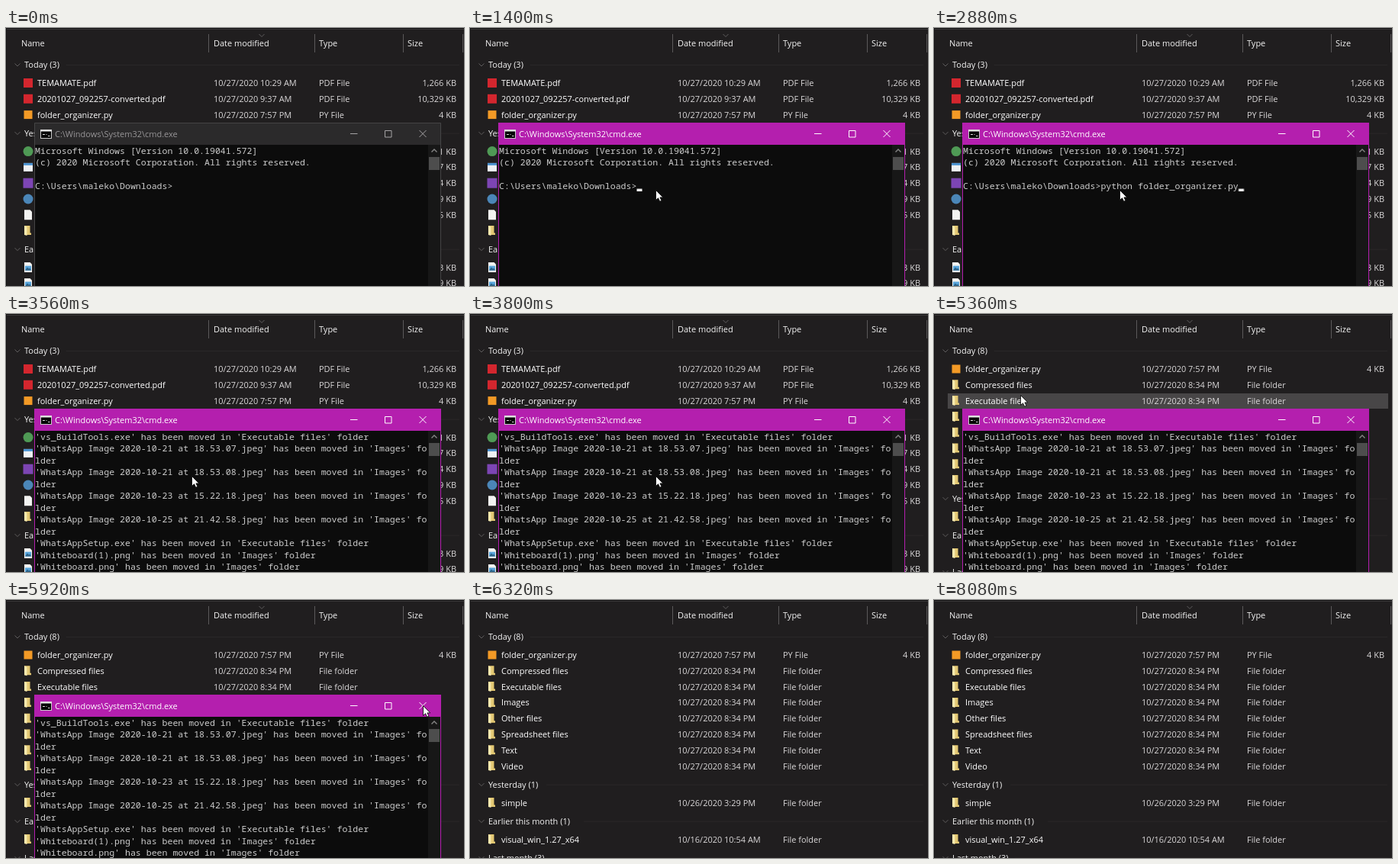
These frames come from a looping animation (600x338 px, 8160 ms). An HTML page:

```html
<!DOCTYPE html>
<html lang="en">
<head>
<meta charset="utf-8">
<title>Folder organizer</title>
<style>
  html, body { margin: 0; width: 100%; height: 100%; overflow: hidden; background: #201e1f; }
  svg { display: block; }
  #stage { width: 100vw; height: 100vh; }
  text { font: 10.97px "Open Sans", "Noto Sans", sans-serif; fill: #ffffff; }
  .dim { fill: #dad8d9; }
  .head { fill: #f4f4f4; }
  .end { text-anchor: end; }
  .console text { font: 11.57px "Noto Sans Mono", "DejaVu Sans Mono", monospace; fill: #cccccc; }
  .chevron { fill: none; stroke: #5f5d5e; }
  .rule { stroke: #2a2829; }

  /* One loop is 8160 ms; every part shares the same clock. */
  .anim { animation: 8160ms step-end infinite; }
  .before { animation-name: before; }
  .after { animation-name: after; }
  .window { animation-name: window; }
  .prompt { animation-name: prompt; }
  .output { animation-name: output; }
  .bar { animation-name: bar; }
  .frame { fill: none; animation-name: frame; }
  .title { animation-name: title; }
  .controls { fill: none; animation-name: controls; }
  .typing { animation-name: typing; }
  .caret { fill: #f2f2f2; animation-name: blink; }
  .hover { fill: #484647; animation-name: hover; }
  .pointer { animation-name: pointer; }

  @keyframes before { 0% { opacity: 1 } 48.529%, to { opacity: 0 } }
  @keyframes after { 0% { opacity: 0 } 48.529%, to { opacity: 1 } }
  @keyframes window { 0% { opacity: 1 } 73.039%, to { opacity: 0 } }
  @keyframes prompt { 0% { opacity: 1 } 42.647%, to { opacity: 0 } }
  @keyframes output { 0% { opacity: 0 } 42.647%, to { opacity: 1 } }
  @keyframes bar { 0% { fill: #2b2a2b } 16.176%, to { fill: #b41fae } }
  @keyframes frame { 0% { stroke: #454445 } 16.176%, to { stroke: #b41fae } }
  @keyframes title { 0% { fill: #979597 } 16.176%, to { fill: #ffffff } }
  @keyframes controls { 0% { stroke: #a5a3a5 } 16.176%, to { stroke: #ffffff } }
  @keyframes hover { 0% { opacity: 0 } 58.333% { opacity: 1 } 69.118%, to { opacity: 0 } }
  @keyframes blink {
    0% { opacity: 0 } 16.176% { opacity: 1 } 22.672% { opacity: 0 }
    29.167% { opacity: 1 } 35.662%, to { opacity: 0 }
  }
  @keyframes typing {
    0% { transform: translateX(0) }
    19.118% { transform: translateX(0); animation-timing-function: steps(26) }
    33.333%, to { transform: translateX(180.5px) }
  }
  @keyframes pointer {
    0% { transform: translate(330px, 345px) }
    10.784% { transform: translate(330px, 345px); animation-timing-function: ease-out }
    15.196% { transform: translate(243px, 212px) }
    52.941% { transform: translate(243px, 212px); animation-timing-function: ease-in-out }
    60.784% { transform: translate(113px, 106px) }
    66.667% { transform: translate(113px, 106px); animation-timing-function: ease-in-out }
    71.569% { transform: translate(546px, 138px) }
    73.039% { transform: translate(546px, 138px); animation-timing-function: ease-in }
    76.961%, to { transform: translate(615px, 165px) }
  }
</style>
</head>
<body>
<svg id="stage" viewBox="0 0 600 338">
  <rect width="600" height="338" fill="#201e1f"/>
  <rect width="600" height="1" fill="#111011"/>
  <path d="M0 1.5H600" stroke="#3b393a"/>
  <rect width="1" height="338" fill="#141314"/>
  <path d="M265.5 8V32M404.5 8V32M520.5 8V32M598.5 8V32" stroke="#5b595a"/>
  <path class="chevron" d="M331.500 8l3.500 3.500 3.500-3.500"/>
  <g id="columns"></g>
  <rect class="hover anim" x="18" y="104" width="577" height="20"/>
  <g id="before" class="before anim"></g>
  <g id="after" class="after anim"></g>

  <g class="window anim">
    <rect x="37" y="124" width="533" height="220" fill="#0c0c0c"/>
    <rect class="bar anim" x="37" y="124" width="533" height="29"/>
    <path class="frame anim" d="M37.5 338V124.5H569.5V338"/>
    <rect x="45.5" y="133.5" width="14" height="11" fill="#050505" stroke="#c9c9c9"/>
    <path d="M45 134.5H60" stroke="#e6e6e6" stroke-width="2"/>
    <path d="M48 139.5h3M52.5 139.5h1M55 141.5h2.500" stroke="#dddddd"/>
    <text class="title anim" x="64" y="143">C:\Windows\System32\cmd.exe</text>
    <path class="controls anim" d="M451 138.500h9.500M496.500 134.500h8.500v8.500h-8.500zM541.500 134l9 9M550.500 134l-9 9"/>
    <rect x="553" y="153" width="16" height="190" fill="#171717"/>
    <path d="M557.500 162.500l3.500-3.500 3.500 3.500" fill="none" stroke="#858585" stroke-width="1.400"/>
    <rect x="554" y="169" width="14" height="17" fill="#4d4d4d"/>
    <svg class="console" x="38" y="153" width="515" height="185">
      <g class="prompt anim">
        <g id="prompt"></g>
        <g class="typing anim">
          <rect x="180.500" y="47" width="340" height="16" fill="#0c0c0c"/>
          <rect class="caret anim" x="180.500" y="57.600" width="7" height="3.400"/>
        </g>
      </g>
      <g id="output" class="output anim"></g>
    </svg>
  </g>

  <g class="pointer anim">
    <path d="M.5 .5V13.500L3.500 10.700 5.700 15.200 8 14.200 5.900 9.900H9.800Z" fill="#fff" stroke="#111" stroke-width=".9"/>
  </g>
</svg>
<script>
  const byId = id => document.getElementById(id);
  const text = (x, y, str, cls = "") => `<text class="${cls}" x="${x}" y="${y}">${str}</text>`;
  const square = (color, r = 6) => `<rect x="${-r}" y="${-r}" width="${2 * r}" height="${2 * r}" fill="${color}"/>`;
  const disc = color => `<circle r="6.500" fill="${color}"/>`;
  const page = '<path d="M-5-6.500H2.500L5-4V6.500H-5Z" fill="#f3f3f1"/>';

  const icons = {
    pdf: square("#d3262e"),
    script: square("#f39a26", 5.5),
    app: disc("#4f9a55"),
    studio: square("#7d45b4", 6.5),
    package: disc("#4b86b8"),
    program: '<path d="M-6-5.500H6V5.500H-6Z" fill="#eef1f4"/><path d="M-6-4H6" stroke="#4b93d1" stroke-width="3"/>',
    file: page,
    image: page + '<path d="M-4-2H4V4H-4Z" fill="#58a5dc"/><path d="M-4 4L-1 0 1 2 2.500 1 4 4Z" fill="#2d6387"/>',
    folder: '<path d="M-5-6.500H2.500V3H4V5.500H-5Z" fill="#e3c873"/><path d="M-5-6.500L-1.500-5V6.500L-5 5.500Z" fill="#f8e9ae"/>'
  };

  // Groups hold rows of [icon, name, date, type, size].
  function list(groups) {
    let y = 48, out = "";
    for (const [label, ...rows] of groups) {
      out += `<path class="chevron" d="M11.500 ${y - 1.5}l3.500 3.500 3.500-3.500"/>`
        + `<path class="rule" d="M${30 + label.length * 5.4} ${y + 0.5}H594"/>`
        + text(24, y + 4, label, "head");
      y += 24;
      for (const [icon, name = "", date = "", type = "", size = ""] of rows) {
        out += `<g transform="translate(29 ${y})">${icons[icon]}</g>`
          + text(41, y + 4, name)
          + text(272, y + 4, date, "dim")
          + text(410, y + 4, type, "dim")
          + text(590, y + 4, size, "dim end");
        y += 20.8;
      }
      y += 3.2;
    }
    return out;
  }

  const today = "10/27/2020 ";
  const folder = (name, date = today + "8:34 PM") => ["folder", name, date, "File folder"];
  const script = ["script", "folder_organizer.py", today + "7:57 PM", "PY File", "4 KB"];
  const hidden = (icon, size) => [icon, "", "", "", size];

  byId("columns").innerHTML = [[20, "Name"], [272, "Date modified"], [410, "Type"], [526, "Size"]]
    .map(([x, label]) => text(x, 24, label, "head")).join("");

  byId("before").innerHTML = list([
    ["Today (3)",
      ["pdf", "TEMAMATE.pdf", today + "10:29 AM", "PDF File", "1,266 KB"],
      ["pdf", "20201027_092257-converted.pdf", today + "9:37 AM", "PDF File", "10,329 KB"],
      script],
    ["Yesterday (6)", hidden("app", "1 KB"), hidden("program", "7 KB"), hidden("studio", "4 KB"),
      hidden("package", "9 KB"), hidden("file", "5 KB"), hidden("folder")],
    ["Earlier this month", hidden("image", "3 KB"), hidden("image", "9 KB")]
  ]);

  byId("after").innerHTML = list([
    ["Today (8)", script, ...["Compressed files", "Executable files", "Images", "Other files",
      "Spreadsheet files", "Text", "Video"].map(name => folder(name))],
    ["Yesterday (1)", folder("simple", "10/26/2020 3:29 PM")],
    ["Earlier this month (1)", folder("visual_win_1.27_x64", "10/16/2020 10:54 AM")],
    ["Last month (3)"]
  ]);

  const COLS = 74;
  const consoleText = lines => lines
    .flatMap(line => line.length > COLS ? [line.slice(0, COLS), line.slice(COLS)] : [line])
    .map((line, i) => text(0, 12 + i * 15.45, line.replace(">", "&gt;"))).join("");
  const moved = (name, dir = "Images") => `'${name}' has been moved in '${dir}' folder`;
  const photo = stamp => moved(`WhatsApp Image 2020-10-${stamp}.jpeg`);

  byId("prompt").innerHTML = consoleText([
    "Microsoft Windows [Version 10.0.19041.572]",
    "(c) 2020 Microsoft Corporation. All rights reserved.",
    "",
    "C:\\Users\\maleko\\Downloads>python folder_organizer.py"
  ]);

  byId("output").innerHTML = consoleText([
    moved("vs_BuildTools.exe", "Executable files"),
    photo("21 at 18.53.07"),
    photo("21 at 18.53.08"),
    photo("23 at 15.22.18"),
    photo("25 at 21.42.58"),
    moved("WhatsAppSetup.exe", "Executable files"),
    moved("Whiteboard(1).png"),
    moved("Whiteboard.png")
  ]);
</script>
</body>
</html>
```
